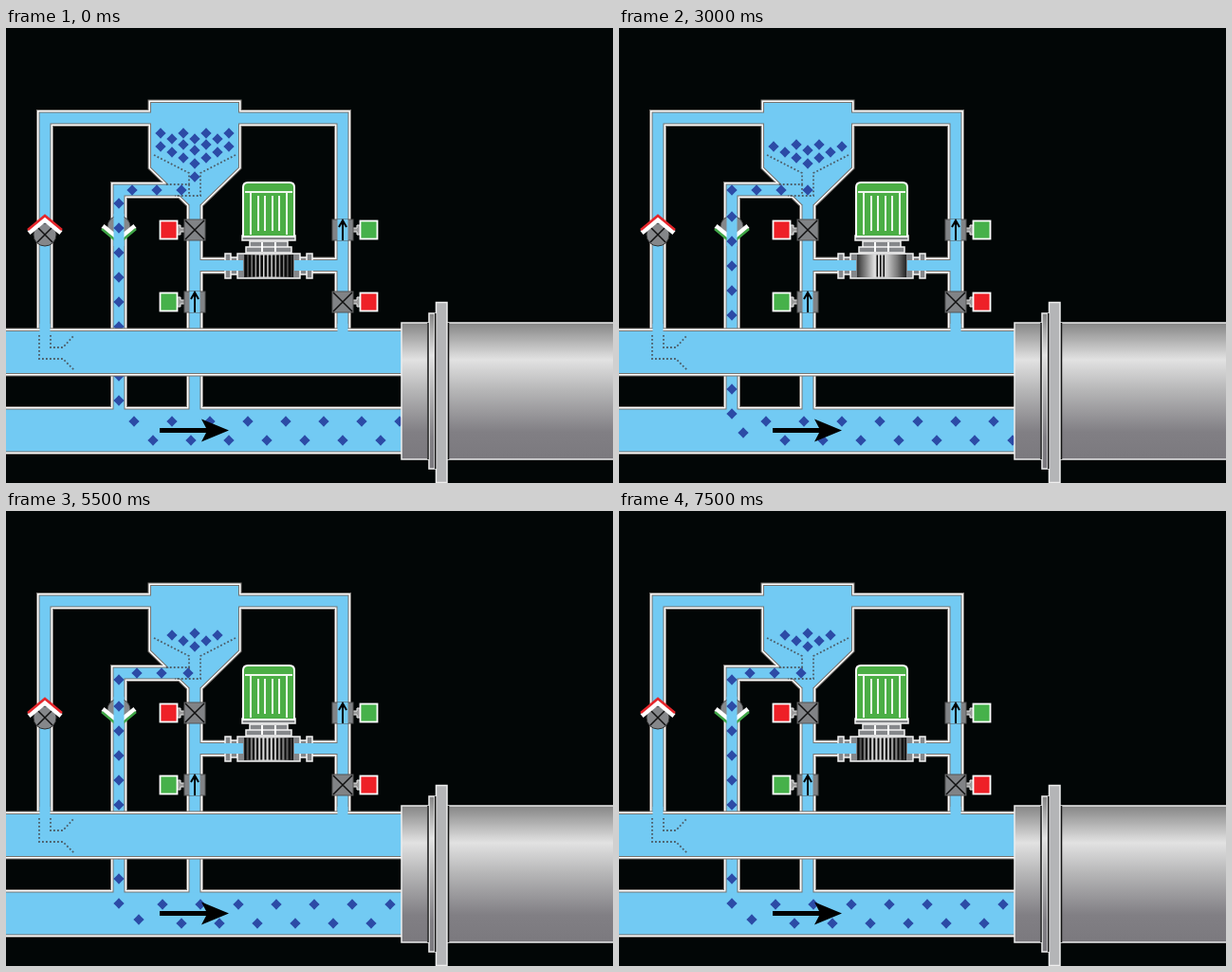
An HTML page that plays this animation: 640x480 px, repeating every 8000 ms.

```html
<!DOCTYPE html>
<html lang="en">
<head>
<meta charset="utf-8">
<title>Filter backwash</title>
<style>
html, body { margin: 0; width: 100%; height: 100%; overflow: hidden; background: #020606; }
svg { display: block; width: 640px; height: 480px; }
.dots { fill: none; stroke: #4c5d68; stroke-width: 1.8; stroke-dasharray: 1.8 2.2; }
.metal { fill: url(#steel); stroke: #eee; stroke-width: 1.5; }
.part { fill: #85878a; stroke: #f4f4f4; stroke-width: 1.5; }
</style>
</head>
<body>
<svg viewBox="0 0 640 480">
  <defs>
    <linearGradient id="steel" x1="0" y1="0" x2="0" y2="1">
      <stop offset="0" stop-color="#858585"/>
      <stop offset=".27" stop-color="#e2e2e2"/>
      <stop offset=".5" stop-color="#b5b5b6"/>
      <stop offset=".8" stop-color="#817f84"/>
      <stop offset="1" stop-color="#7b797e"/>
    </linearGradient>
    <linearGradient id="chrome">
      <stop offset="0" stop-color="#333"/>
      <stop offset=".18" stop-color="#888"/>
      <stop offset=".35" stop-color="#ddd"/>
      <stop offset=".6" stop-color="#ccc"/>
      <stop offset=".82" stop-color="#777"/>
      <stop offset="1" stop-color="#222"/>
    </linearGradient>
    <path id="gem" d="M0-5.700 2.800-2.800 5.700 0 2.800 2.800 0 5.700-2.800 2.800-5.700 0-2.800-2.800Z"/>
  </defs>

  <g id="pipes"></g>
  <path class="dots" d="M156 134 193 153V165H168M242 134 205 153V177H178M193 165V177"/>

  <!-- check valve, open -->
  <circle cx="119" cy="210" r="12" fill="#85878a" stroke="#444"/>
  <path d="M102 209 119 223 136 209" fill="none" stroke="#fff" stroke-width="5"/>
  <path d="M101 212 119 227 137 212" fill="none" stroke="#3fa546" stroke-width="2.500"/>
  <path d="M119 196V230" stroke="#72caf3" stroke-width="11"/>

  <g id="flow" fill="#2c4ba6"></g>
  <g id="main"></g>
  <path class="dots" d="M35 324V349H60L72 361M47 324V337H60L72 324"/>
  <path d="M162 422H211L206 412.500 235 424.500 206 436.500 211 427H162Z"/>

  <!-- check valve, closed -->
  <circle cx="41" cy="218" r="12" fill="#85878a" stroke="#333"/>
  <path d="M33 210 49 226M49 210 33 226" stroke="#111" stroke-width="1.500"/>
  <path d="M24 216 41 202 58 216" fill="none" stroke="#fff" stroke-width="5"/>
  <path d="M23 213 41 198 59 213" fill="none" stroke="#e5252a" stroke-width="2.500"/>

  <g id="valves"></g>

  <!-- pump and motor -->
  <path class="part" d="M231 238H237V264H231ZM237 242H244V260H237ZM317 238H323V264H317ZM310 242H317V260H310Z"/>
  <rect class="part" x="244" y="238" width="66" height="26"/>
  <path d="M228 250.500H250M304 250.500H326" stroke="#72caf3" stroke-width="11"/>
  <rect x="251" y="239" width="52" height="24" fill="url(#chrome)"/>
  <path id="blades" d="M251.500 251H303" stroke="#0b0b0b" stroke-width="23"/>
  <path class="part" d="M257 225H297V231H257ZM253 231H301V237H253Z"/>
  <path d="M270 226V236M284 226V236" stroke="#fff" stroke-width="2"/>
  <rect class="part" x="249" y="219" width="56" height="5"/>
  <path d="M250 220V168Q250 163 255 163H299Q304 163 304 168V220Z" fill="#4bae45" stroke="#fff" stroke-width="2"/>
  <path d="M252 173H302M258 174V218M266 177V214M273 177V214M281 177V214M288 177V214M296 174V218" stroke="#f0f8ee" stroke-width="2"/>

  <!-- filter housing -->
  <rect class="metal" x="417" y="311" width="28" height="144"/>
  <rect class="metal" x="466" y="311" width="180" height="144"/>
  <rect class="metal" x="446" y="301" width="6" height="164"/>
  <rect x="453.500" y="289.500" width="11.500" height="190" fill="#b4b5b7" stroke="#eee" stroke-width="1.500"/>
  <path d="M445 311V455M452.700 301V465M466.500 311V455" stroke="#111" stroke-width="1.500"/>
</svg>
<script>
const $ = id => document.getElementById(id);
const BLUE = '#72caf3';
// each layer: colour and how far it reaches past the water
const LAYERS = [['#77736f', 7], ['#fff', 5], ['#77736f', 2], [BLUE, 0]];
const HOPPER = 'M153 79H245V147L205 186H193L153 147Z';
const THIN = 'M41 330V95H160M240 95H355V330M190 171H119V410M199 180V410M199 250.500H355';

const pipe = (d, size, [color, rim]) =>
  `<path d="${d}" fill="none" stroke="${color}" stroke-width="${size + rim}"/>`;

$('pipes').innerHTML = LAYERS.map(layer =>
  pipe(THIN, 11, layer) + pipe('M-9 424.500H430', 44, layer) +
  `<path d="${HOPPER}" fill="${layer[0]}" stroke="${layer[0]}" stroke-width="${layer[1]}"/>`).join('');

$('main').innerHTML = LAYERS.map(layer => pipe('M-9 342H430', 44, layer)).join('') +
  pipe('M41 312V325M355 312V325', 11, [BLUE, 0]);

function valve(x, y, side, open) {
  const color = open ? '#46b14a' : '#ee2027';
  const sign = open
    ? `<path d="M-5.500-11H5.500V11H-5.500Z" fill="${BLUE}"/>
       <path d="M0 11V-8M-4-3 0-10 4-3" fill="none" stroke="#000" stroke-width="2"/>`
    : '<path d="M-10-10 10 10M10-10-10 10" stroke="#111" stroke-width="1.500"/>';
  return `<g transform="translate(${x} ${y})">
    <g transform="scale(${side} 1)">
      <path d="M10-2H15V-5H19V5H15V2H10Z" fill="#999" stroke="#eee"/>
      <rect x="18.500" y="-9.500" width="18" height="19" fill="${color}" stroke="#fff" stroke-width="1.800"/>
    </g>
    <rect x="-11" y="-11" width="22" height="22" fill="#818386" stroke="#555"/>${sign}</g>`;
}
$('valves').innerHTML = valve(199, 213, -1, false) + valve(199, 289, -1, true) +
  valve(355, 213, 1, true) + valve(355, 289, 1, false);

// hopper contents, top row first; one row drains per step
const ROWS = [
  [[163, 111], [187, 111], [211, 111], [235, 111]],
  [[175, 117], [199, 117], [223, 117]],
  [[163, 125], [187, 123], [211, 123], [235, 125]],
  [[175, 131], [199, 129], [223, 131], [187, 137], [211, 137], [199, 143]]
];
const ENTRY = [[], [[125, 421]], [[131, 427]], [[140, 431]]];

// point at distance s along the drain: down, left, down
const drain = s => s < 14 ? [199, 157 + s] : s < 94 ? [213 - s, 171] : [119, 77 + s];

function gems(step) {
  const list = [...ROWS.slice(step).flat(), ...ENTRY[step]];
  for (let i = 0; i < 13; i++)
    list.push(drain(26 * i + 2 * (i > 0) + 2 * (i > 3) + 7 * step));
  for (let x = 135 + 10 * step; x < 420; x += 40)
    list.push([x, 415], [x + 20, 435]);
  return list;
}

const BLADES = ['2.7 1.5', '1.6 2.6', '0 20 1.5 2 1.5 2 1.5 99', '2 2.2'];
let shown = -1;
function draw(now) {
  const step = Math.floor(now / 500) % 4;
  if (step !== shown) {
    shown = step;
    $('flow').innerHTML = gems(step).map(([x, y]) => `<use href="#gem" x="${x}" y="${y}"/>`).join('');
    $('blades').setAttribute('stroke-dasharray', BLADES[step]);
  }
  requestAnimationFrame(draw);
}
draw(performance.now());
</script>
</body>
</html>
```
